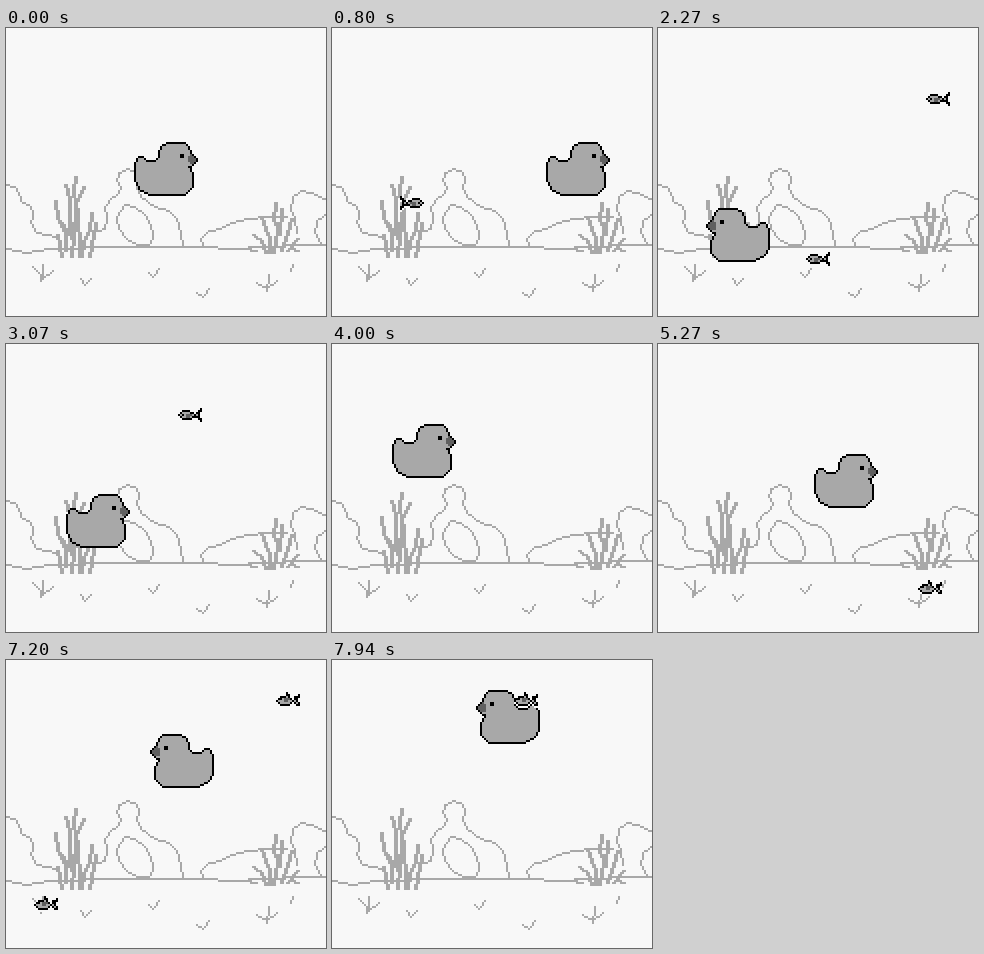
An HTML page with a canvas that plays this animation: 320x288 px, repeating every 8000 ms.

```html
<!DOCTYPE html>
<html lang="en">
<head>
<meta charset="utf-8">
<title>Duck pond</title>
<style>
html, body { margin: 0; width: 100%; height: 100%; overflow: hidden; background: #f8f8f8; }
canvas { display: block; width: 320px; height: 288px; image-rendering: pixelated; }
</style>
</head>
<body>
<canvas id="stage" width="160" height="144"></canvas>
<script>
const LOOP = 8000, STEPS = 120;
const PAPER = '#f8f8f8', LIGHT = '#a8a8a8', DARK = '#606060', INK = '#000';
const W = 160, H = 144;

const stage = document.getElementById('stage').getContext('2d');
const scenery = document.createElement('canvas');
scenery.width = W;
scenery.height = H;

// "x,y x,y ..." to points
const pts = s => s.split(' ').map(p => p.split(',').map(Number));
const half = s => pts(s).map(([x, y]) => [x >> 1, y >> 1]);

// Hard-edged line, one cell at a time
function line(c, a, b, size = 1) {
  const n = Math.max(Math.abs(b[0] - a[0]), Math.abs(b[1] - a[1]), 1);
  for (let i = 0; i <= n; i++) {
    c.fillRect(Math.round(a[0] + (b[0] - a[0]) * i / n),
               Math.round(a[1] + (b[1] - a[1]) * i / n), size, 1);
  }
}

function stroke(c, p, colour, size) {
  c.fillStyle = colour;
  for (let i = 1; i < p.length; i++) line(c, p[i - 1], p[i], size);
}

// Even-odd scan fill without smoothing
function fill(c, p, colour) {
  c.fillStyle = colour;
  const ys = p.map(q => q[1]);
  for (let y = Math.min(...ys); y <= Math.max(...ys); y++) {
    const hits = [];
    p.forEach((a, i) => {
      const b = p[(i + 1) % p.length];
      if ((a[1] <= y) !== (b[1] <= y)) hits.push(a[0] + (y - a[1]) * (b[0] - a[0]) / (b[1] - a[1]));
    });
    hits.sort((u, v) => u - v);
    for (let i = 0; i + 1 < hits.length; i += 2) {
      const x = Math.round(hits[i]);
      c.fillRect(x, y, Math.round(hits[i + 1]) - x + 1, 1);
    }
  }
}

const ground = '0,220 20,224 42,220 100,218 176,219 194,218 228,220 252,218 296,217 319,216';
const cliff = '0,156 8,158 12,164 14,172 24,178 26,186 24,194 30,204 40,206 52,208';
const arch = '90,202 98,200 100,190 98,178 104,170 112,164 114,158 110,152 112,144 120,140 ' +
  '128,142 132,148 130,160 134,168 148,178 162,182 170,190 174,204 176,218';
const hole = '112,184 118,177 128,178 138,186 144,196 147,208 142,216 132,217 120,210 112,200 110,190 112,184';
const mound = '196,218 194,210 202,202 214,200 224,194 240,190 262,188 280,188';
const boulder = '290,204 288,190 284,180 286,168 294,163 306,164 314,168 319,170';
const nook = '319,186 310,192 308,204 314,214';

const tallWeed = [
  '68,148 66,160 68,180 66,205 64,228', '58,156 62,170 62,200 66,214', '76,158 70,172',
  '48,172 50,190 58,205 58,222', '50,206 54,228', '84,184 82,200 76,212 74,228',
  '88,194 86,206 82,228', '70,180 72,228', '54,194 62,206'
];
const lowWeed = [
  '268,174 266,190 270,200 266,225', '274,180 272,206', '254,188 258,200 262,210 262,225',
  '284,190 280,204 274,222', '246,206 254,212 258,224', '290,210 280,222', '240,220 248,222', '290,222 284,220'
];
const sprigs = [
  '26,238 34,246 34,252', '36,236 36,250', '46,242 36,250', '74,250 78,256 84,251',
  '142,244 146,248 152,240', '190,264 196,268 202,261', '250,254 260,260 270,252',
  '262,246 260,262', '284,242 286,236'
];

const back = scenery.getContext('2d');
back.fillStyle = PAPER;
back.fillRect(0, 0, W, H);
[ground, cliff, arch, hole, mound, boulder, nook, ...sprigs].forEach(s => stroke(back, half(s), LIGHT));
[...tallWeed, ...lowWeed].forEach(s => stroke(back, half(s), LIGHT, 2));

const body = pts('16,0 25,0 27,2 28,5 31,8 31,9 28,12 27,12 29,16 29,22 28,23 25,26 7,26 ' +
  '2,23 0,19 0,10 2,7 4,7 6,9 10,9 12,7 12,4 14,1 16,0');
const beak = pts('28,6 30,8 30,9 28,11 27,9 27,7');
const plain = pts('0,3 2,1 5,1 8,3 9,2 11,0 10,3 11,6 9,4 8,4 5,5 2,5 0,3');
const finned = pts('0,4 2,2 4,2 5,0 6,2 8,4 9,2 11,1 10,4 11,6 9,5 8,4 6,6 2,6 0,4');

// Runs draw at (x, y), mirrored inside width w when asked
function place(x, y, w, flip, draw) {
  const at = p => p.map(([u, v]) => [x + (flip ? w - 1 - u : u), y + v]);
  draw(at, (u, v, s) => stage.fillRect(x + (flip ? w - u - s : u), y + v, s, s));
}

function drawDuck(x, y, left) {
  place(x, y, 32, left, (at, dot) => {
    fill(stage, at(body), LIGHT);
    fill(stage, at(beak), DARK);
    stroke(stage, at(body), INK);
    dot(23, 6, 2);
  });
}

function drawFish(x, y, right, shape) {
  place(x, y, 12, right, (at, dot) => {
    stroke(stage, at(shape.map(([u, v]) => [u, v + 1])), PAPER);
    fill(stage, at(shape), LIGHT);
    stroke(stage, at(shape), INK);
    stage.fillStyle = DARK;
    dot(4, 3, 2);
    dot(6, 3, 1);
    stage.fillStyle = INK;
    dot(2, 3, 1);
  });
}

// Duck path as step,position pairs in stage pixels
const pathX = pts('0,128 13,222 16,222 21,180 34,48 36,36 39,60 67,60 79,156 89,156 92,144 120,144');
const pathY = pts('0,114 14,114 21,160 34,180 39,206 52,102 56,60 57,60 60,80 65,102 79,110 99,110 119,30 120,30');

function follow(path, n) {
  const i = path.findIndex(p => p[0] > n);
  const [a, b] = [path[i - 1], path[i]];
  return a[1] + (b[1] - a[1]) * (n - a[0]) / (b[0] - a[0]);
}

// x is the left edge at step `at`; each fish swims until step `end`
const school = [
  { at: 21, x: 140, y: 84, end: 23, right: true, shape: plain },
  { at: 21, x: 252, y: 112, end: 40, shape: plain },
  { at: 34, x: 268, y: 32, end: 56, shape: plain },
  { at: 62, x: 320, y: 62, end: 75, shape: plain },
  { at: 94, x: 140, y: 118, end: 120, shape: finned },
  { at: 119, x: 182, y: 16, end: 120, shape: finned }
];

function render(t) {
  const n = Math.floor(t * STEPS / LOOP + 1e-6) % STEPS;
  stage.drawImage(scenery, 0, 0);
  const left = (n >= 15 && n < 37) || n >= 90;
  drawDuck(Math.round(follow(pathX, n) / 2), Math.round(follow(pathY, n) / 2), left);
  for (const f of school) {
    const x = f.x + (f.right ? 8 : -8) * (n - f.at);
    if (n < f.end && x > -24 && x < 320) drawFish(x / 2, f.y, f.right, f.shape);
  }
}

function tick(now) {
  render(now % LOOP);
  requestAnimationFrame(tick);
}
render(0);
requestAnimationFrame(tick);
</script>
</body>
</html>
```
